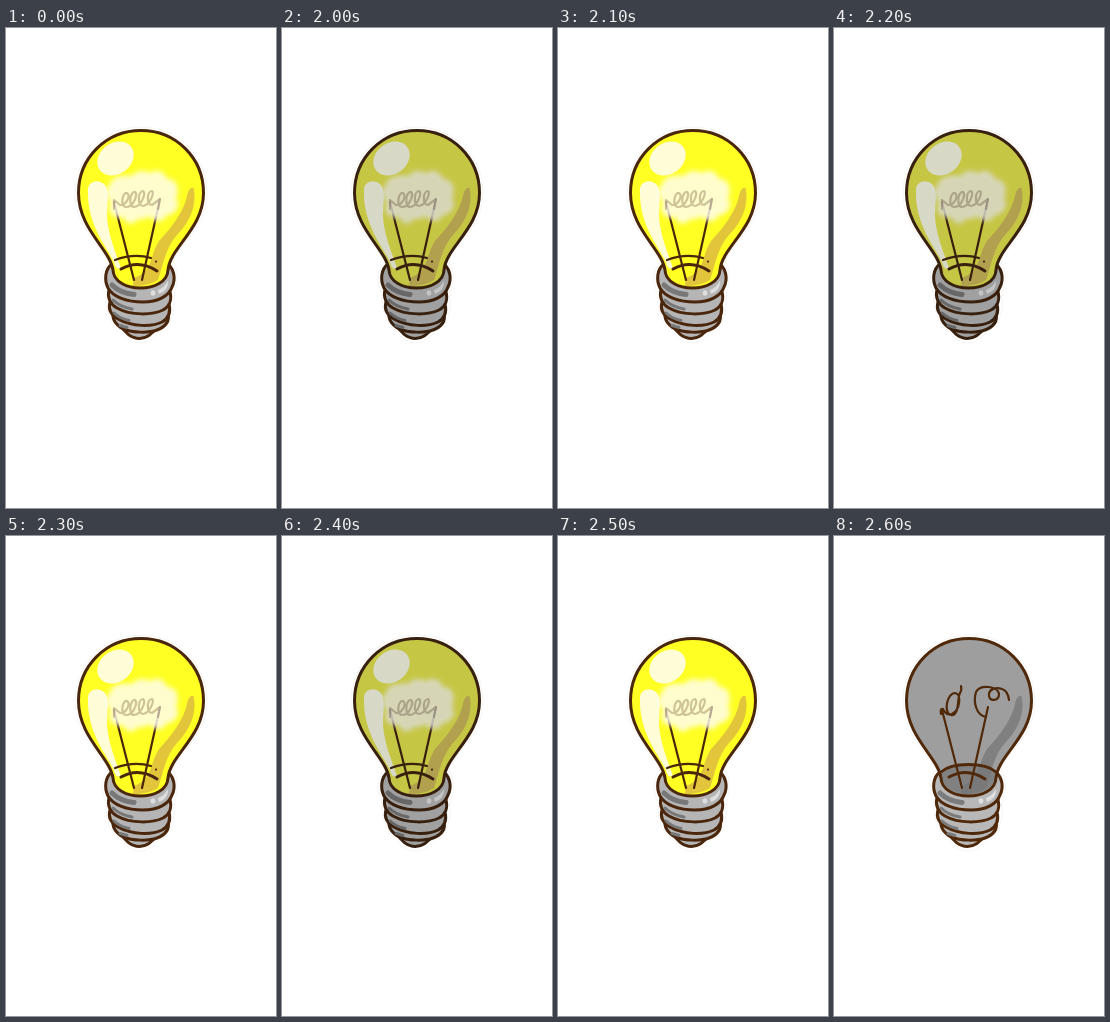
These frames come from a looping animation (270 px wide and 480 px high, 4600 ms). An HTML page:

```html
<!DOCTYPE html>
<html lang="en">
<head>
<meta charset="utf-8">
<title>Light bulb</title>
<style>
html, body { margin: 0; width: 100%; height: 100%; overflow: hidden; background: #fff; }
svg { display: block; width: 100%; height: 100%; }
.line { fill: none; stroke: var(--ink); stroke-width: 3; stroke-linecap: round; stroke-linejoin: round; }
.wire { stroke-width: 2.2; }
.metal { fill: var(--metal); }
.glass { fill: var(--glass); }
.shade { fill: var(--shade); }
.shine { fill: var(--shine); }
.dark { fill: none; stroke: var(--dark); stroke-linecap: round; }
.glint { fill: var(--glint); }
</style>
</head>
<body>
<svg viewBox="0 0 270 480" preserveAspectRatio="xMidYMid meet">
  <defs>
    <filter id="soft" x="-30%" y="-30%" width="160%" height="160%"><feGaussianBlur stdDeviation="2.5"/></filter>
    <path id="bulb" d="M107 242C104 221 72.500 201 72.500 165C72.500 130 100 102.500 135 102.500C170 102.500 197.500 130 197.500 165C197.500 201 164 219 162 242C161 266 108 266 107 242Z"/>
  </defs>

  <path id="halo" fill="none" stroke="#f8f5f2" d="M102 234C97 220 69 200 69 165C69 128 98 99 135 99C172 99 201 128 201 165C201 200 171 218 167 234C174 245 171 258 168 267C169 281 167 297 155 302C146 311 142 315 133 315C125 315 119 309 114 302C104 297 100 284 100 267C95 256 94 243 102 234Z"/>

  <g id="base">
    <path class="line metal" d="M115 297C118 304 125 310.500 133.500 310.500C141 310.500 147 305 151 299Z"/>
    <path class="line metal" d="M107 284C106 291 110 297 117 301C127 305 143 305 151 302C159 299 164 294 162 285Z"/>
    <path class="line metal" d="M104 274C102 281 105 287 112 291C126 299 146 299 156 294C163 290 165 284 163 276Z"/>
    <path class="line metal" d="M103 262C101 269 104 276 111 280C125 288 147 287 157 282C164 278 166 271 164 264Z"/>
    <path class="line metal" d="M106 236C99 241 98 252 102 260C107 269 121 274 137 274C152 274 163 268 166 259C170 251 168 242 163 237Z"/>
    <path class="dark" stroke-width="5" d="M106 257Q114 265 128 266.500"/>
    <path class="dark" stroke-width="3" d="M107 272Q114 279 126 281M108 285Q114 290.500 123 292.500M114 297.500L121 299.500"/>
    <ellipse class="glint" cx="147" cy="265" rx="2.300" ry="2.700"/>
    <path class="glint" d="M152 262Q158 260 162 253Q163 262 153 266Z"/>
  </g>

  <use href="#bulb" class="glass"/>
  <path class="shade" d="M187.500 160C191 174 186 192 171 207C160 219 157 237 152 252Q143 258 127 258L128 250C147 243 143 229 153 213C168 197 178 182 181 168C182 162 185 159 187.500 160Z"/>
  <path id="socket" fill="#777" d="M107 236C118 226 151 226 162 236C163 266 106 266 107 236Z" opacity=".75"/>

  <g id="gloss">
    <ellipse class="shine" cx="109.500" cy="130.500" rx="19.500" ry="15.500" transform="rotate(-36 109.500 130.500)"/>
    <path class="shine" d="M82 163C81 154 91 150 98 156C104 162 101 176 101 188C102 207 109 222 115 240Q110 243 108 234C102 221 81 197 82 163Z"/>
  </g>

  <path class="line wire" d="M108 174L128 252M154 171L136 252"/>
  <path class="line" d="M115 241Q133 231 151 243"/>
  <path id="rimLit" class="line wire" d="M109 232Q128 225 145 230M150 233.500v.1"/>
  <path id="rimOff" class="line" d="M107 236C118 226 151 226 162 236"/>

  <g id="coil">
    <path filter="url(#soft)" fill="var(--glow)" opacity=".83" d="M104 157C105 147 120 147 126 148C132 140 141 144 145 145C153 138 160 147 161 151C171 150 174 162 170 170C176 180 167 187 161 187C156 197 147 193 143 188C138 193 133 190 131 192C126 199 118 194 117 189C105 192 100 181 105 174C97 169 99 160 104 157Z"/>
    <path class="line wire" opacity=".27" d="M108 181L108 172L114 177C121 177 125 167 121 165C116 164 114 179 120 179C128 179 132 166 129 164C124 163 122 179 128 179C136 178 140 165 137 163C132 163 131 178 137 178C144 177 149 164 146 163C141 163 140 176 146 177L154 171L152 181"/>
  </g>
  <g id="broken">
    <path class="line wire" d="M107 178Q106 172 109 173Q112 180 118 178C126 174 128 158 121 157C113 157 109 177 117 179C126 180 123 161 126 157Q128 154 127 150"/>
    <path class="line wire" d="M152 181C142 179 139 166 142 156C146 148 164 150 165 158C165 165 156 166 155 160C154 153 162 151 168 153Q174 155 175 164"/>
  </g>

  <use href="#bulb" class="line"/>
</svg>
<script>
const LOOP = 4600, FLICKER = 2000, OFF = 2600, STEP = 100;
const looks = {
  bright: { ink: '#4a260c', glass: '#ffff24', shade: '#e2c53a', shine: '#fffcd8', glow: '#fffdf0', metal: '#b5b5b5', dark: '#777777', glint: '#dedede' },
  dim: { ink: '#38200f', glass: '#c6c645', shade: '#b1a04e', shine: '#d8d8c6', glow: '#dadacf', metal: '#a0a0a0', dark: '#676767', glint: '#c4c4c4' },
  off: { ink: '#50290a', glass: '#9e9e9e', shade: '#808080', metal: '#b8b8b8', dark: '#7b7b7b', glint: '#e0e0e0' }
};
const svg = document.querySelector('svg');
const show = (id, on) => { document.getElementById(id).style.display = on ? '' : 'none'; };
let current;

function lookAt(t) {
  if (t >= OFF) return 'off';
  if (t < FLICKER) return 'bright';
  return Math.floor((t - FLICKER) / STEP) % 2 ? 'bright' : 'dim';
}

function update(t) {
  const name = lookAt(t);
  if (name === current) return;
  current = name;
  for (const [key, color] of Object.entries(looks[name])) svg.style.setProperty('--' + key, color);
  const lit = name !== 'off';
  ['gloss', 'coil', 'rimLit'].forEach(id => show(id, lit));
  ['broken', 'socket', 'rimOff'].forEach(id => show(id, !lit));
}

const start = performance.now();
function tick() {
  update((performance.now() - start) % LOOP);
  requestAnimationFrame(tick);
}
tick();
</script>
</body>
</html>
```
